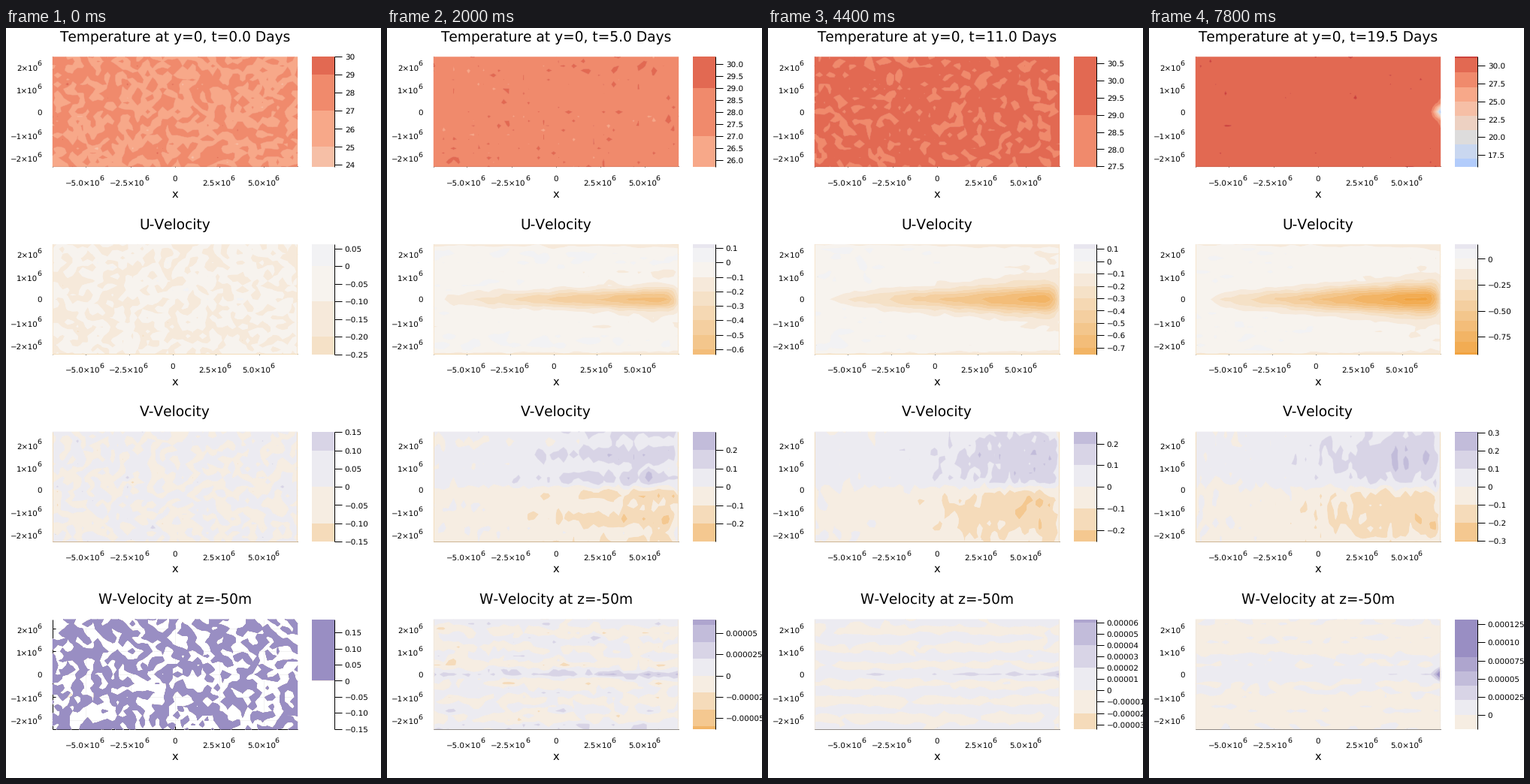
A matplotlib script that plays this animation: 499 by 999 pixels, repeating every 8 s.

```python
import numpy as np
import matplotlib as mpl
import matplotlib.pyplot as plt
from matplotlib.animation import FuncAnimation
from matplotlib.colors import LinearSegmentedColormap
from matplotlib.patches import Rectangle

W, H, DPI = 499, 999, 64
PT = 72 / DPI                      # points per pixel
FRAMES, INTERVAL = 40, 200
LEFT, RIGHT, HEIGHT = 62, 388, 146.5
TOPS = [38.4 + 249.75 * i for i in range(4)]
BAR = (407.5, 437.5)
MID = 225

plt.rcParams["font.family"] = "DejaVu Sans"
plt.rcParams["text.hinting"] = "none"
plt.rcParams["text.kerning_factor"] = 6    # plain advances, no kerning
fig = plt.figure(figsize=(W / DPI, H / DPI), dpi=DPI, facecolor="white")
ax = fig.add_axes([0, 0, 1, 1])
ax.set_xlim(0, W)
ax.set_ylim(H, 0)
ax.axis("off")

# ---- fields: X runs 0..1 west to east, Y runs 1..-1 north to south --------
NX, NY = 50, 25
X, Y = np.meshgrid(np.linspace(0, 1, NX), np.linspace(1, -1, NY))
A = np.abs(Y)
EDGE = np.tanh((1.01 - X) / 0.04)
NOISE_SPAN = 3                     # days between independent noise fields
rng = np.random.default_rng(11)


def fade(t, days):
    return np.exp(-t / days)


def ramp(t, start, end):
    s = np.clip((t - start) / (end - start), 0, 1)
    return s * s * (3 - 2 * s)


def bump(v, width):
    return np.exp(-(v / width) ** 2)


def wave(v, period):
    return np.cos(2 * np.pi * v / period)


def bank(axis=None, white=1):
    """Noise fields; those after the first `white` are stretched along axis."""
    fields = []
    for i in range(9):
        f = rng.standard_normal((NY, NX))
        if axis is not None and i >= white:
            f = f + 0.4 * (np.roll(f, 1, axis) + np.roll(f, -1, axis))
        fields.append(f / f.std())
    return fields


NOISE = [bank(), bank(1), bank(0), bank(1, white=2)]


def noise(p, t):
    i, f = divmod(t / NOISE_SPAN, 1)
    a, b = NOISE[p][int(i)], NOISE[p][int(i) + 1]
    return a * np.cos(f * np.pi / 2) + b * np.sin(f * np.pi / 2)


def cooling(t):
    return 13.3 * max(0, (t - 11) / 8.5) ** 2.4


def temperature(t):
    f = 26.95 + .165 * t + .4 * (1 - fade(t, 1)) + .88 * fade(t, 14) * noise(0, t)
    f -= .3 * ramp(t, 9, 15) * bump(Y, .12)
    f -= cooling(t) * bump(1 - X, .022) * bump(Y, .1)
    f -= (.8 * ramp(t, 12, 15) + .1 * cooling(t)) * bump(1 - X, .02) * bump(Y, .45)
    return f


def u_velocity(t):
    width = .13 + .14 * X * (.3 + .7 * ramp(t, 3, 7))
    jet = 1.08 * (1 - fade(t, 1)) * (.46 + .022 * t) * X ** .8 * EDGE
    f = -jet * bump(Y, width)
    f -= .16 * ramp(t, 0, 1) * fade(t, 3) * (.7 + .8 * X) * wave(Y, .47)
    f -= .018 + .077 * fade(t, 3) + .07 * ramp(t, 2, 10) * X ** 2
    f += .05 * ramp(t, 0, 3) * bump(t - 6, 4) * bump(A - .87, .07)
    f += (.02 + .025 * fade(t, 2)) * noise(1, t)
    f[[0, -1]] -= .1 * ramp(t, 0, 1)
    return f


def v_velocity(t):
    early = ramp(t, 0, 2) * min(1, fade(t - 3, 2))
    late = ramp(t, 0, 3) * (1 - .85 * early)
    bands = np.tanh(Y / .04) * (.07 + .13 * wave(A - .13, .45)) * (.35 + .85 * X)
    spread = np.tanh(Y / .1) * (.012 + .2 * X ** 1.4) * (1 - .5 * ((A - .45) / .55) ** 2)
    grow = 1 + .8 * (X - .5) * min(t, 1)
    return ((early * bands + late * spread) * EDGE
            + (.028 + .017 * fade(t, 2)) * grow * noise(2, t))


def w_velocity(t):
    if t == 0:
        return .055 * noise(3, 0)
    f = 2.5 * min(1, fade(t - 3, 1)) * wave(Y, .48)
    f = f + 2.4 * ramp(t, 3, 6) * fade(t, 10) * wave(Y, .32)
    f += 1.6 * bump(Y, .07) * (.3 + .9 * X) * (1 - .6 * ramp(t, 11, 15))
    f += (2 + 11 * ramp(t, 10, 19)) * bump(1 - X, .018) * bump(Y, .09)
    f += ramp(t, 10, 19) * (.9 * bump(Y, .3) - .4)
    f += (.3 + 2.2 * fade(t, 4)) * noise(3, t)
    return f * 1e-5


# ---- value ranges -------------------------------------------------------
def t_range(t):
    return 23.9 + .4 * t - .0067 * t * t - cooling(t), 30 + .062 * t


def u_range(t):
    return -(.54 + .0195 * t - .29 * fade(t, 1)), .14 - .078 * fade(t, 3)


def v_range(t):
    r = .28 + .025 * wave(t - 3, 16) - .139 * fade(t, .5)
    return -r, r


def w_range(t):
    if t == 0:
        return -.1505, .1905
    return (-(1.5 + 10.5 * fade(t, 6.5)) * 1e-5,
            (6 + 7.2 * ramp(t, 10, 19) + 8 * fade(t, 2)) * 1e-5)


# ---- colours ------------------------------------------------------------
PUOR = LinearSegmentedColormap.from_list("puor3", ["#f1a340", "#f7f7f7", "#998ec3"])
COOLWARM = mpl.colormaps["coolwarm"]


def scale(lo, hi, bands, cmap):
    colors = [cmap(i / (bands - 1)) for i in range(bands)]
    return np.linspace(lo, hi, bands + 1), colors + colors[-1:]


class Panel:
    def __init__(self, i, title, field, limits, levels, origin=(MID, 73.2),
                 unit=(23.7, 30.4), side=None, floor=None):
        self.title, self.field, self.limits = title, field, limits
        self.levels, self.colors = levels
        self.origin, self.unit = origin, unit          # px, px per 1e6
        self.side, self.floor = side, floor            # border colours
        self.top, self.bottom = TOPS[i], TOPS[i] + HEIGHT


PANELS = [
    Panel(0, "Temperature at y=0, t={:.1f} Days", temperature, t_range,
          scale(5, 35, 15, COOLWARM)),
    Panel(1, "U-Velocity", u_velocity, u_range, scale(-1, 1, 20, PUOR),
          (221.7, 73.2), (23.1, 30.4), "#f7e6cf", "#f3dcb8"),
    Panel(2, "V-Velocity", v_velocity, v_range, scale(-.5, .5, 10, PUOR),
          (MID, 76.6), (23.7, 29.8), "#f3dfc0", "#cdb593"),
    Panel(3, "W-Velocity at z=-50m", w_velocity, w_range,
          scale(-1e-4, 1e-4, 10, PUOR), side="#f1e8dd", floor="#8f8a86"),
]


# ---- drawing helpers ----------------------------------------------------
def label(x, y, s, size=10.2, ha="center"):
    return ax.text(x, y, s, fontsize=size * PT, ha=ha, va="baseline", color="black")


def number(x, y, s, size=10.2, ha="center"):
    return label(x, y, s.replace("-", "\u2212"), size, ha)


def line(x, y, color="black", width=1, z=1):
    return ax.plot(x, y, color=color, lw=width * PT, zorder=z,
                   solid_capstyle="butt")[0]


def power(x, y, mantissa):
    number(x + .4, y, mantissa + "\u00d710", ha="right")
    label(x - .5, y - 6.3, "6", 9.4, "left")


def tick_step(span):
    e = 10 ** np.floor(np.log10(span))
    r = span / e
    return e * (.25 if r < 2.5 else .5 if r < 5 else 1)


def decimals(step):
    for d in range(8):
        s = step * 10 ** d
        if round(s) > 0 and abs(s - round(s)) < 1e-6:
            return d
    return 8


def tick_text(v, step):
    if abs(v) < step / 2:
        return "0"
    d = decimals(step)
    s = f"{v:.{d}f}"
    return s[:-1] if d == 6 and s.endswith("0") else s


def draw_axes(p):
    x0, y0 = p.origin
    kx, ky = p.unit
    label(MID, p.bottom + 41, "x", 14.67)
    for n in range(-2, 3):
        y = p.top + y0 - n * ky
        x = x0 + n * 2.5 * kx
        if n:
            power(42, y + 5.7, f"{n}")
            power(x + (14.8 if n > 0 else 18.7), p.bottom + 24.5, f"{n * 2.5:.1f}")
        else:
            number(48, y + 3.9, "0", ha="right")
            number(x, p.bottom + 19, "0")
        line([LEFT, RIGHT], [y, y], "#ededed", .7, 0)
        line([x, x], [p.top, p.bottom], "#ededed", .7, 0)
        line([LEFT, LEFT + 4], [y, y])
        line([x, x], [p.bottom - 4, p.bottom])
    line([LEFT + .5, LEFT + .5], [p.top, p.bottom])
    line([LEFT, RIGHT], [p.bottom - .5, p.bottom - .5])
    line([BAR[1], BAR[1]], [p.top, p.bottom], z=4)
    return label(MID, p.top - 20.4, p.title, 18.67)


heading = [draw_axes(p) for p in PANELS][0]
live = []


def draw_bar(p, t):
    lo, hi = p.limits(t)

    def ypos(v):
        return p.top + HEIGHT * (hi - v) / (hi - lo)

    edges = np.append(p.levels, max(hi, p.levels[-1]))
    for a, b, c in zip(edges[:-1], edges[1:], p.colors):
        a, b = max(a, lo), min(b, hi)
        if b > a:
            box = Rectangle((BAR[0], ypos(b)), BAR[1] - BAR[0], ypos(a) - ypos(b),
                            facecolor=c, lw=0, antialiased=False, zorder=2)
            live.append(ax.add_patch(box))

    step = tick_step(hi - lo)
    for n in range(int(np.ceil(lo / step)), int(np.floor(hi / step)) + 1):
        y = ypos(n * step)
        live.append(line([BAR[1], BAR[1] + 9.5], [y, y], z=4))
        live.append(number(450.8, y + 3.9, tick_text(n * step, step), 10.4, "left"))


def draw_field(p, t):
    cs = ax.contourf(LEFT + X * (RIGHT - LEFT), p.top + (1 - Y) * HEIGHT / 2,
                     p.field(t), levels=p.levels, colors=p.colors,
                     extend="max", antialiased=True, zorder=2)
    cs.set_edgecolor("face")
    cs.set_linewidth(.4)
    live.append(cs)
    if p.side and (t > 0 or p.field is not w_velocity):
        for x in (LEFT + .5, RIGHT - .5):
            live.append(line([x, x], [p.top, p.bottom], p.side, z=3))
        y = p.bottom - .3
        live.append(line([LEFT, RIGHT], [y, y], p.floor, z=3))


def update(frame):
    t = frame * .5
    while live:
        live.pop().remove()
    heading.set_text(PANELS[0].title.format(t))
    for p in PANELS:
        draw_field(p, t)
        draw_bar(p, t)
    return []


def reset():
    return update(0)


anim = FuncAnimation(fig, update, frames=FRAMES, init_func=reset,
                     interval=INTERVAL, repeat=True, repeat_delay=0, blit=False)
plt.show()
```
